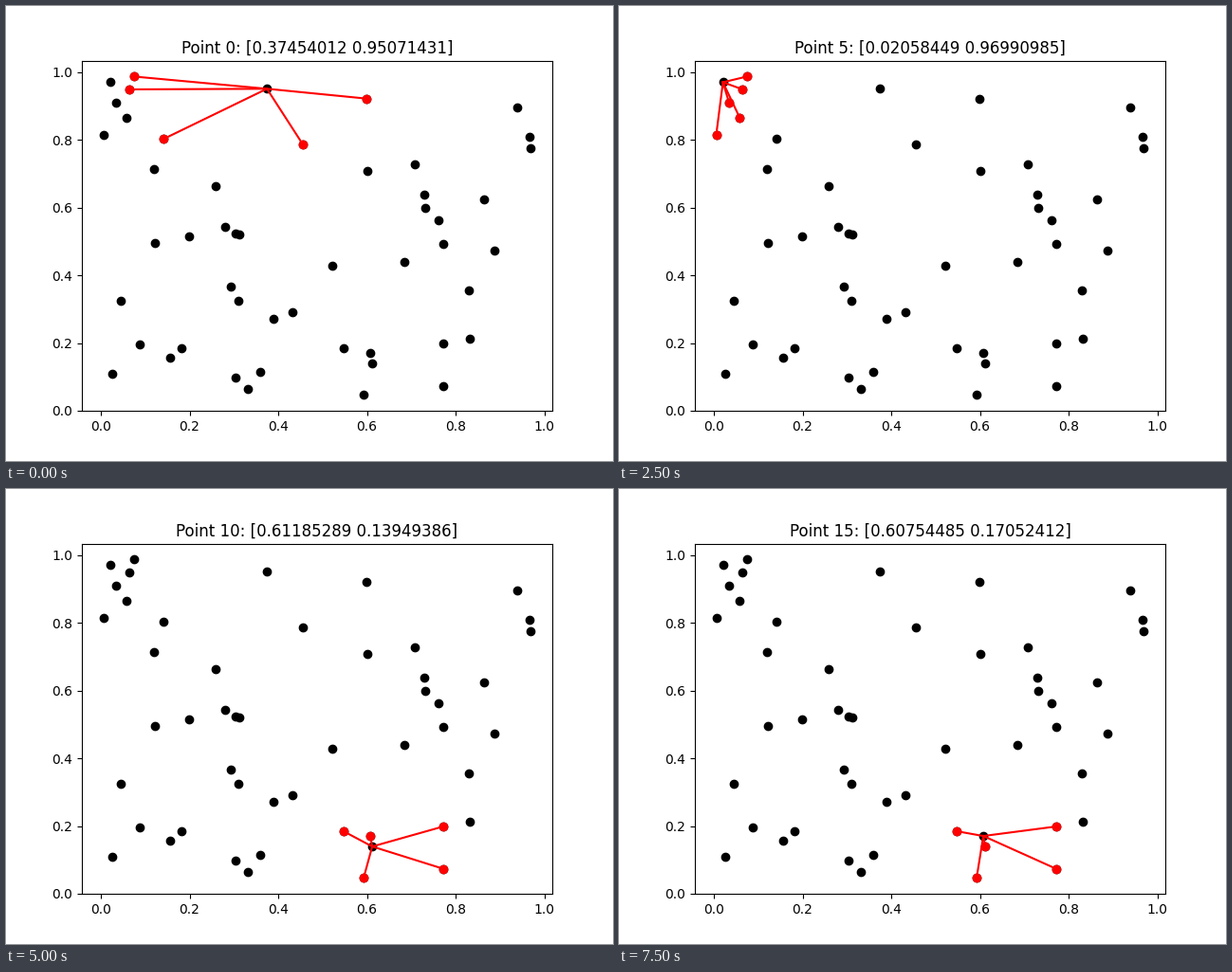
These frames come from a looping animation (640x480 px, 8 s). A matplotlib script:

```python
import matplotlib.pyplot as plt
import numpy as np
from matplotlib.animation import FuncAnimation

FRAMES = 16
INTERVAL = 500
NEIGHBORS = 5

np.random.seed(42)
points = np.random.rand(50, 2)

plt.rcParams["font.family"] = "DejaVu Sans"
fig, ax = plt.subplots(figsize=(6.4, 4.8), dpi=100)


def nearest(i):
    """Return the points closest to point i, leaving out the point itself."""
    dist = np.linalg.norm(points - points[i], axis=1)
    return points[np.argsort(dist)[1:NEIGHBORS + 1]]


def update(i):
    ax.clear()
    near = nearest(i)
    ax.scatter(*points.T, color="black")
    ax.scatter(*near.T, color="red")
    for p in near:
        ax.plot(*zip(points[i], p), color="red")
    ax.set_title(f"Point {i}: {points[i]}")


anim = FuncAnimation(fig, update, frames=FRAMES, init_func=lambda: None,
                     interval=INTERVAL, repeat=True, repeat_delay=0)
plt.show()
```
